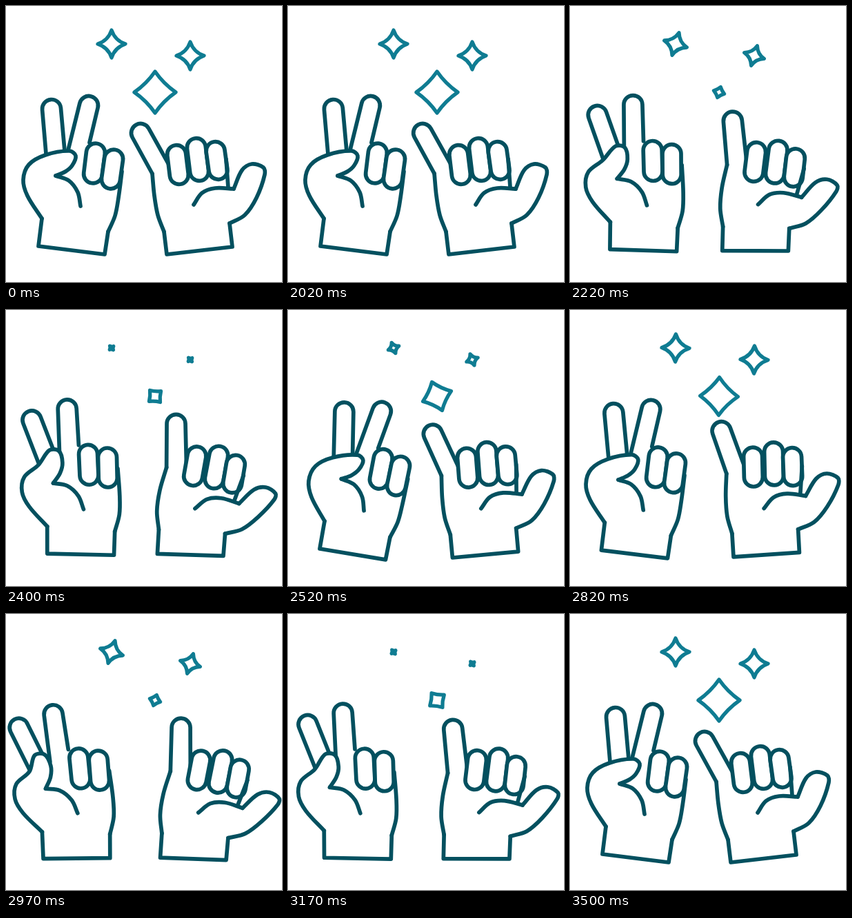
Recreate the animation shown at these times as an HTML page with a canvas. Size 400 px wide and 400 px high, loop 3.52 s.

```html
<!DOCTYPE html>
<html lang="en">
<head>
<meta charset="utf-8">
<title>Waving hands</title>
<style>
html, body { margin: 0; width: 100%; height: 100%; overflow: hidden; background: #fff; }
canvas { display: block; width: 400px; height: 400px; }
</style>
</head>
<body>
<canvas id="stage" width="400" height="400"></canvas>
<script>
const ctx = document.getElementById('stage').getContext('2d');
const LOOP = 3520, START = 2020, CYCLE = 750, TURN = 720;
const HAND = '#03505f', STAR = '#0f7c92';
const FINGER = 13.5;
const SWING = [2010, 2340, 2640, 3010, 3490];

// Hands at rest. "bend" is degrees at the wrist and per pixel above it;
// "lean" and "shift" hold the value reached at each swing time.
const left = {
  pivot: [95, 354], bend: [5.3, 0.027],
  lean: [0, -1.4, 1.4, -1.55, 0], shift: [0, 16, -10.5, 8, 0],
  wrist: [[52, 308], [47, 348], [143, 360], [148, 327]],
  fingers: [
    { cap: [66, 149], feet: [[58, 214], [85, 210]] },
    { cap: [120, 144], feet: [[90, 209], [121, 198]] }
  ],
  knuckles: [{ at: [128, 228], tilt: 7, half: 29 }, { at: [154, 236.5], tilt: 8, half: 28.5 }],
  back: [[52, 308], [31, 275], [25, 252], [33, 230], [57, 216]],
  thumb: [[92, 210], [101, 217], [96, 231], [86, 240]],
  web: [72, 246],
  lines: [
    [[72, 246], [91, 253], [104, 270], [108, 290]],
    [[148, 327], [158, 304], [163, 278], [168, 240]]
  ]
};

const right = {
  pivot: [280.5, 354.5], bend: [6.5, 0.055],
  lean: [0, 1.5, -0.5, 1.4, 0], shift: [0, -17, 17.5, -10, 0],
  wrist: [[229, 327], [233, 360], [328, 349], [324, 315]],
  fingers: [{ cap: [195, 184], feet: [[212, 243], [235, 228]] }],
  knuckles: [
    { at: [249, 230], tilt: -7, half: 28.5 },
    { at: [278, 222.5], tilt: -7, half: 31 },
    { at: [305.5, 224], tilt: -8, half: 27.5 }
  ],
  lines: [
    [[212, 243], [215, 275], [220, 303], [229, 327]],
    [[272, 288], [284, 271], [303, 264], [330, 265]],
    [[319, 222], [322, 263]],
    [[330, 265], [342, 238], [356, 229], [373, 234], [375, 244], [363, 278], [346, 303], [324, 315]]
  ]
};

// A star shrinks between "from" and "low" and is back to full size at "to".
const stars = [
  { x: 153, y: 55, r: 20, waist: 0.25, from: 130, low: 390, to: 710 },
  { x: 267, y: 72, r: 20, waist: 0.25, from: 90, low: 390, to: 690 },
  { x: 216, y: 125, r: 30, waist: 0.41, from: 0, low: 250, to: 660 }
];

const rad = degrees => degrees * Math.PI / 180;
const mix = (a, b, k) => a + (b - a) * k;

function ease(from, to, t) {
  const u = Math.min(1, Math.max(0, (t - from) / (to - from)));
  return u * u * (3 - 2 * u);
}

function swing(values, t) {
  const next = SWING.findIndex(time => t < time);
  if (next < 1) return 0;
  return mix(values[next - 1], values[next], ease(SWING[next - 1], SWING[next], t));
}

function rotate([x, y], [cx, cy], angle, scale = 1) {
  const c = Math.cos(angle) * scale, s = Math.sin(angle) * scale;
  return [cx + (x - cx) * c - (y - cy) * s, cy + (x - cx) * s + (y - cy) * c];
}

function paint(filled) {
  if (filled) ctx.fill();
  ctx.stroke();
}

// Smooth curve through points, tangents weighted by chord length.
function curve(p, filled) {
  const dist = (a, b) => Math.hypot(a[0] - b[0], a[1] - b[1]);
  const tangent = i => {
    const a = p[Math.max(i - 1, 0)], b = p[Math.min(i + 1, p.length - 1)];
    const d = dist(a, p[i]) + dist(p[i], b);
    return [(b[0] - a[0]) / d, (b[1] - a[1]) / d];
  };
  ctx.beginPath();
  ctx.moveTo(...p[0]);
  for (let i = 0; i < p.length - 1; i++) {
    const a = p[i], b = p[i + 1], d = dist(a, b) / 3, m = tangent(i), n = tangent(i + 1);
    ctx.bezierCurveTo(a[0] + m[0] * d, a[1] + m[1] * d, b[0] - n[0] * d, b[1] - n[1] * d, ...b);
  }
  paint(filled);
}

// Round cap with straight sides running tangentially to both feet.
function finger([x, y], feet) {
  const [start, end] = feet.map(([fx, fy], i) => {
    const open = Math.acos(FINGER / Math.hypot(fx - x, fy - y));
    return Math.atan2(fy - y, fx - x) + (i ? -open : open);
  });
  ctx.beginPath();
  ctx.moveTo(...feet[0]);
  ctx.arc(x, y, FINGER, start, end);
  ctx.lineTo(...feet[1]);
  paint();
}

function knuckle([x, y], angle, half) {
  ctx.save();
  ctx.translate(x, y);
  ctx.rotate(angle);
  ctx.beginPath();
  ctx.roundRect(-FINGER, -half, 2 * FINGER, 2 * half, FINGER);
  ctx.restore();
  paint(true);
}

function hand(h, t) {
  const lean = swing(h.lean, t), shift = swing(h.shift, t);
  const angleAt = ([, y]) => rad(lean * (h.bend[0] + h.bend[1] * (h.pivot[1] - y)));
  const bent = p => {
    const [x, y] = rotate(p, h.pivot, angleAt(p));
    return [x + shift, y];
  };

  h.fingers.forEach(f => finger(bent(f.cap), f.feet.map(bent)));
  if (h.thumb) {
    const curl = Math.min(lean, 0);
    const tip = h.thumb.map(p => rotate(p, h.web, rad(20 * curl), 1 - 0.17 * curl));
    curve([...h.back, ...tip, h.web].map(bent), true);
  }
  h.knuckles.forEach(k => knuckle(bent(k.at), rad(k.tilt) + angleAt(k.at), k.half));
  h.lines.forEach(points => curve(points.map(bent)));
  ctx.beginPath();
  h.wrist.forEach(p => ctx.lineTo(...bent(p)));
  paint();
}

function star({ x, y, r, waist, from, low, to }, t) {
  const phase = Math.max(0, t - START) % CYCLE;
  const dip = ease(from, low, phase) - ease(low, to, phase);
  const size = r * (1 - 0.82 * dip), c = size * waist;
  ctx.save();
  ctx.translate(x, y);
  ctx.rotate(Math.PI / 2 * ease(0, TURN, phase));
  ctx.beginPath();
  ctx.moveTo(0, -size);
  ctx.quadraticCurveTo(c, -c, size, 0);
  ctx.quadraticCurveTo(c, c, 0, size);
  ctx.quadraticCurveTo(-c, c, -size, 0);
  ctx.quadraticCurveTo(-c, -c, 0, -size);
  ctx.closePath();
  ctx.restore();
  paint();
}

function render(t) {
  ctx.fillStyle = '#fff';
  ctx.fillRect(0, 0, 400, 400);
  ctx.lineCap = ctx.lineJoin = 'round';
  ctx.lineWidth = 5.7;
  ctx.strokeStyle = HAND;
  hand(left, t);
  hand(right, t);
  ctx.lineWidth = 5.3;
  ctx.strokeStyle = STAR;
  stars.forEach(s => star(s, t));
}

const began = performance.now();
function tick() {
  render((performance.now() - began) % LOOP);
  requestAnimationFrame(tick);
}
tick();
</script>
</body>
</html>
```
